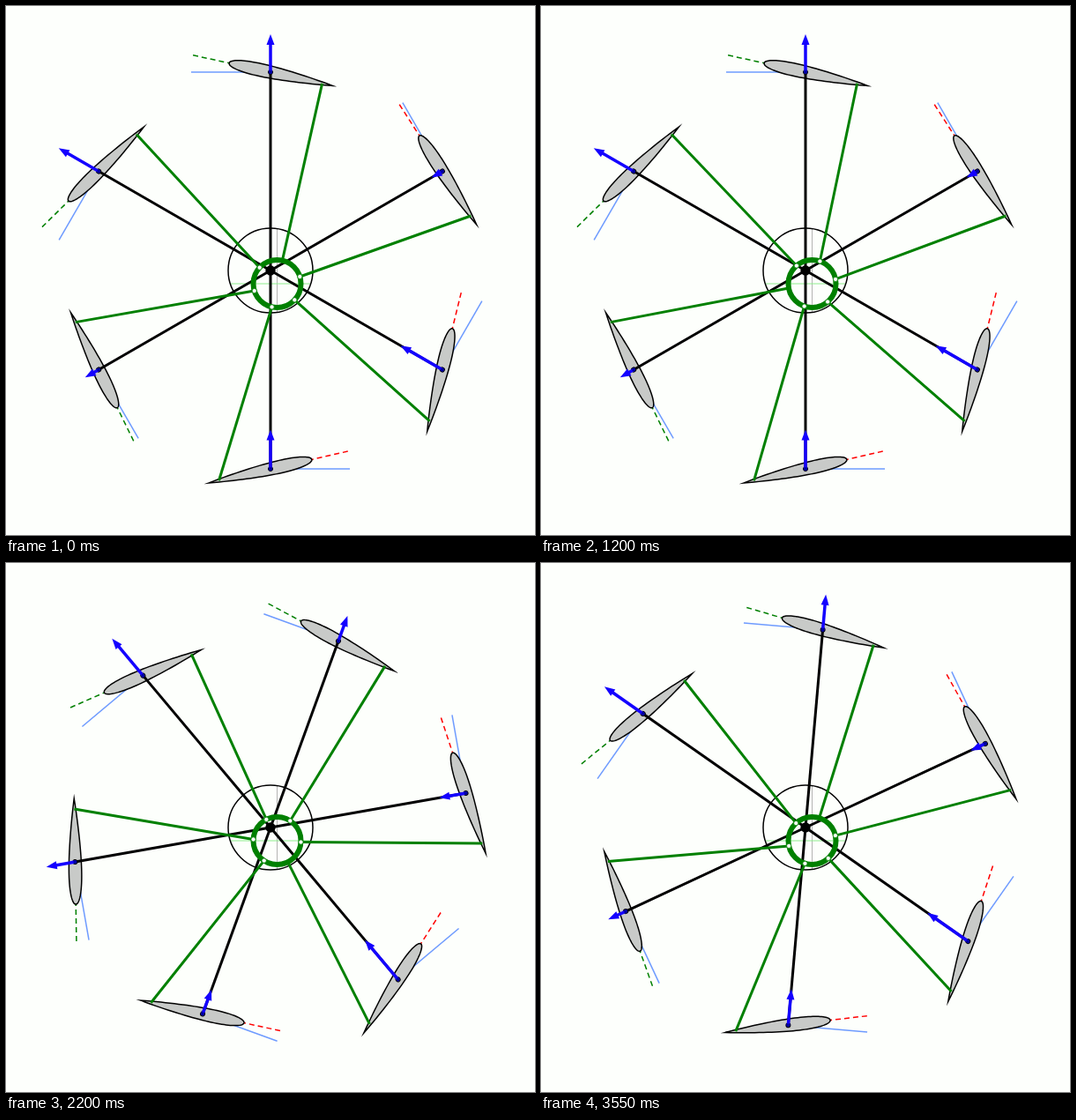
Write an HTML page with a canvas that moves like this. It is 600 by 600 pixels and loops after 3.6 s.

```html
<!DOCTYPE html>
<html>
<head>
<meta charset="utf-8">
<title>Cyclorotor</title>
<style>
  html, body { margin: 0; width: 100%; height: 100%; overflow: hidden; background: #fdfffc; }
  canvas { display: block; }
</style>
</head>
<body>
<canvas id="stage" width="600" height="600"></canvas>
<script>
const ctx = document.getElementById('stage').getContext('2d');
const BLADES = 6, STEP = 50, STEPS = 72;
const HUB = { x: 300, y: 300 }, ECC = { x: 7.5, y: 15 };
const RING = { x: HUB.x + ECC.x, y: HUB.y + ECC.y, r: 27 };
const ARM = 225, LEVER = 60, CHORD = 120, NOSE = 48, GUIDE = 90;
const GREEN = '#008000', BLUE = '#1400ff';

// Symmetric airfoil, nose towards -x, pivot at the origin
const airfoil = new Path2D();
const halfThickness = x => 0.6 * CHORD *
  (0.2969 * Math.sqrt(x) - 0.126 * x - 0.3516 * x ** 2 + 0.2843 * x ** 3 - 0.1036 * x ** 4);
for (let i = -40; i < 40; i++) {
  const x = (i / 40) ** 2;
  airfoil.lineTo(x * CHORD - NOSE, Math.sign(i) * halfThickness(x));
}
airfoil.closePath();

function line(x1, y1, x2, y2, color, width, dash = []) {
  ctx.setLineDash(dash);
  ctx.strokeStyle = color;
  ctx.lineWidth = width;
  ctx.beginPath();
  ctx.moveTo(x1, y1);
  ctx.lineTo(x2, y2);
  ctx.stroke();
  ctx.setLineDash([]);
}

function circle(x, y, r, fill, stroke, width) {
  ctx.beginPath();
  ctx.arc(x, y, r, 0, 2 * Math.PI);
  if (fill) { ctx.fillStyle = fill; ctx.fill(); }
  if (stroke) { ctx.strokeStyle = stroke; ctx.lineWidth = width; ctx.stroke(); }
}

// Blade at a clockwise angle from the top; the rod length to the ring centre fixes its pitch
function makeBlade(angle) {
  const s = Math.sin(angle), c = Math.cos(angle);
  const radial = ECC.x * s - ECC.y * c, tangent = ECC.x * c + ECC.y * s;
  const e2 = ECC.x ** 2 + ECC.y ** 2;
  let pitch = 0;
  for (let i = 0; i < 6; i++) {
    pitch = Math.asin((e2 - 2 * ARM * radial - 2 * LEVER * tangent * Math.cos(pitch)) /
      (2 * LEVER * (ARM - radial)));
  }
  const x = HUB.x + ARM * s, y = HUB.y - ARM * c;
  return {
    angle, pitch, x, y,
    rodX: x + LEVER * Math.cos(angle + pitch),
    rodY: y + LEVER * Math.sin(angle + pitch)
  };
}

function atBlade(b, draw) {
  ctx.save();
  ctx.translate(b.x, b.y);
  ctx.rotate(b.angle);
  draw(b);
  ctx.restore();
}

function drawFoil({ pitch }) {
  line(0, 0, -GUIDE, 0, '#6e9bff', 1.5);
  ctx.rotate(pitch);
  line(-GUIDE, 0, 0, 0, pitch > 0 ? GREEN : '#ff0000', 1.5, [6, 4]);
  ctx.fillStyle = '#c8cac8';
  ctx.fill(airfoil);
  ctx.strokeStyle = '#000';
  ctx.lineWidth = 1.5;
  ctx.stroke(airfoil);
}

function drawForce({ pitch }) {
  const length = Math.abs(pitch) * 180 / Math.PI * 3;
  circle(0, 0, 2.5, '#0000a0', '#000', 1);
  if (pitch < 0) ctx.rotate(Math.PI);
  line(0, 0, 0, -length, BLUE, 3.5);
  ctx.fillStyle = BLUE;
  ctx.beginPath();
  ctx.moveTo(0, -length - 6);
  ctx.lineTo(4.5, -length + 6);
  ctx.lineTo(-4.5, -length + 6);
  ctx.fill();
  circle(0, 0, 2, '#0000a0');
}

function render(turn) {
  const blades = Array.from({ length: BLADES }, (_, i) =>
    makeBlade(2 * Math.PI * (i / BLADES - turn)));
  const master = blades[0];
  const ringAngle = Math.atan2(master.rodY - RING.y, master.rodX - RING.x);

  ctx.fillStyle = '#fdfffc';
  ctx.fillRect(0, 0, 600, 600);
  line(RING.x, 253, RING.x, 347, '#b4b4b4', 1);
  line(254.5, RING.y, 345.5, RING.y, '#90ee90', 1.2);
  circle(HUB.x, HUB.y, 48, null, '#000', 1.5);

  blades.forEach(b => atBlade(b, drawFoil));
  blades.forEach(b => line(HUB.x, HUB.y, b.x, b.y, '#000', 3));
  circle(HUB.x, HUB.y, 5.7, '#000');
  circle(RING.x, RING.y, RING.r, null, GREEN, 6);

  // The first rod is fixed to the ring, the others are hinged on it
  blades.forEach((b, i) => {
    const a = ringAngle + 2 * Math.PI * i / BLADES;
    const x = RING.x + RING.r * Math.cos(a), y = RING.y + RING.r * Math.sin(a);
    line(b.rodX, b.rodY, x, y, GREEN, 3);
    if (i) circle(x, y, 2.6, '#fff', GREEN, 0.8);
  });
  blades.forEach(b => atBlade(b, drawForce));
}

function tick() {
  const step = Math.floor((performance.now() + 1) / STEP) % STEPS;
  render(step / STEPS);
  requestAnimationFrame(tick);
}
tick();
</script>
</body>
</html>
```
